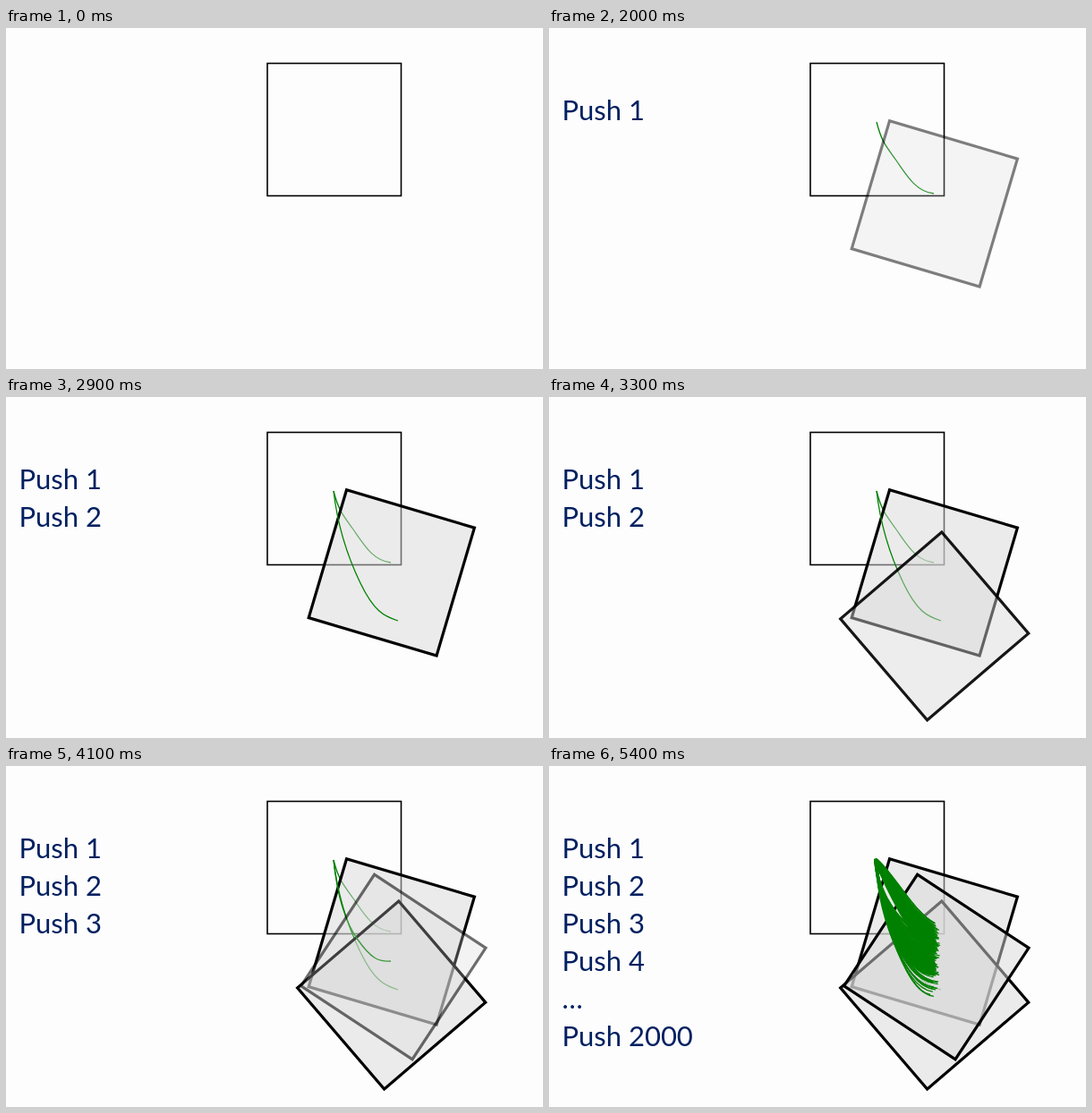
Animation, 600 px wide and 381 px high, one loop 5600 ms. Source, as an HTML page:

```html
<!DOCTYPE html>
<html lang="en">
<head>
<meta charset="utf-8">
<title>Pushes</title>
<style>
  html, body { margin: 0; width: 100%; height: 100%; overflow: hidden; background: #fdfdfe; }
  svg { display: block; width: 100vw; height: 100vh; }
  text { font: 31px Lato, sans-serif; fill: #002060; }
  .trail { fill: none; stroke: #008000; stroke-width: 1.3; }
  .block { fill: #d9d9d9; fill-opacity: .5; stroke: #000; stroke-width: 3.2; }
</style>
</head>
<body>
<svg id="stage" viewBox="0 0 600 381">
  <defs>
    <linearGradient id="soft" x2="0" y2="1">
      <stop offset=".9" stop-color="#fff"/>
      <stop offset="1" stop-color="#fff" stop-opacity="0"/>
    </linearGradient>
  </defs>
  <rect x="292" y="39.5" width="149.5" height="148" fill="none" stroke="#000" stroke-width="1.6"/>
</svg>
<script>
const LOOP = 5600, STEP = 100, SIDE = 149, EDGE = 40, TOP = 104;
const stage = document.getElementById('stage');
const updates = [];

const progress = (t, start, duration) => Math.min(1, Math.max(0, (t - start) / duration));

function add(parent, tag, attrs) {
  const node = document.createElementNS('http://www.w3.org/2000/svg', tag);
  for (const key in attrs) node.setAttribute(key, attrs[key]);
  return parent.appendChild(node);
}

function addText(label, y, start) {
  const node = add(stage, 'text', { x: 14.5, y });
  node.textContent = label;
  updates.push(t => node.setAttribute('visibility', t >= start ? 'visible' : 'hidden'));
}

// Reveals a trail group from top to bottom with a soft edge.
function addTrails(paths, height, start, duration) {
  const id = 'wipe' + start;
  const mask = add(stage, 'mask', { id, maskUnits: 'userSpaceOnUse', x: 0, y: 0, width: 600, height: 381 });
  const cover = add(mask, 'rect', { width: 600, height: EDGE * 10, fill: 'url(#soft)' });
  const group = add(stage, 'g', { mask: `url(#${id})` });
  for (const d of paths) add(group, 'path', { d, class: 'trail' });
  updates.push(t => {
    const bottom = TOP + progress(t, start, duration) * (height + EDGE);
    cover.setAttribute('y', bottom - EDGE * 10);
  });
}

function addBlock(x, y, angle, start) {
  const node = add(stage, 'rect', {
    x: -SIDE / 2, y: -SIDE / 2, width: SIDE, height: SIDE,
    transform: `translate(${x} ${y}) rotate(${angle})`, class: 'block'
  });
  updates.push(t => node.setAttribute('opacity', progress(t, start, 440)));
}

let seed = 7;
function random() {
  seed = (seed * 16807) % 2147483647;
  return seed / 2147483647;
}
const spread = () => (random() + random() + random() - 1.5) / 0.75;

// Two arms leave the same point and meet again near their ends.
function makeBundle(count) {
  return Array.from({ length: count }, (_, i) => {
    const right = i % 2, s = spread(), stray = random() < 0.1 ? 1.5 : 1;
    const endX = 430 + spread() * 4;
    const endY = right ? 193 + s * 11 * stray : 218 + s * 18 * stray;
    const x = 365 + s * (right ? -1 : 1) * 0.8, y = 105 + spread();
    const c1 = right ? [379 - s * 3, 125 + s * 5] : [367.5 + spread() * 2, 148 + s * 5];
    const c2 = right ? [405 + spread() * 3, endY - 11] : [394 + spread() * 3, endY - 4];
    return `M${x} ${y}C${c1} ${c2} ${endX} ${endY}`;
  });
}

const pushes = [
  { start: 1500, fade: 1780, block: [430.8, 196.4, 16.5], height: 82,
    trail: 'M366 105C372 128 376 131 388 148S410 183 430 185' },
  { start: 2500, fade: 2900, block: [430.7, 256, 49.4], height: 147,
    trail: 'M366 105C370 140 381 177 396 208S422 245 438 250' },
  { start: 3600, fade: 3850, block: [432.8, 224.5, 33.4], height: 115,
    trail: 'M366 105C370 145 378 173 393 194S416 219 430 218' }
];

pushes.forEach((push, i) => {
  addText('Push ' + (i + 1), 103 + i * 42, push.start);
  addTrails([push.trail], push.height, push.start - STEP, 300);
  addBlock(...push.block, push.fade);
});
['Push 4', '…', 'Push 2000'].forEach((label, i) => addText(label, 229 + i * 42, 4400));
addTrails(makeBundle(320), 153, 4400, 900);

function draw(now) {
  const t = Math.floor((now % LOOP) / STEP) * STEP;
  for (const update of updates) update(t);
  requestAnimationFrame(() => draw(performance.now()));
}
draw(performance.now());
</script>
</body>
</html>
```
